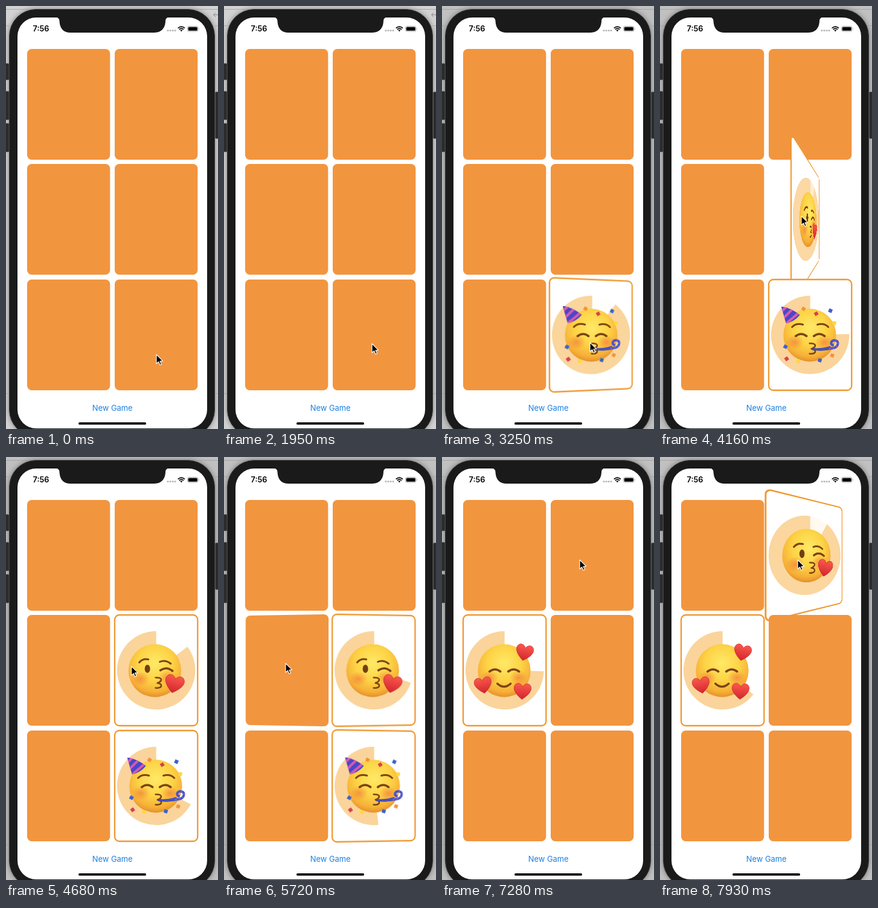
Recreate the animation shown at these times as an HTML page. Size 351x699 px, loop 8000 ms.

```html
<!DOCTYPE html>
<html lang="en">
<head>
<meta charset="utf-8">
<title>Memory game</title>
<style>
  html, body { margin: 0; width: 100%; height: 100%; overflow: hidden; }
  #stage { position: relative; width: 351px; height: 699px; overflow: hidden; background: #d2d2d2; }
  #stage.dimmed { background: #c0c0c0; }
  #stage.dimmed .arrow { display: none; }
  #stage > svg { position: absolute; left: 0; top: 0; overflow: visible; }
  #body { position: absolute; left: 5px; top: 5px; width: 341px; height: 707px; box-sizing: border-box;
    border: 1px solid #3a3a3a; border-radius: 45px; background: #1a1a1a; box-shadow: 0 0 9px rgba(0,0,0,.4); }
  .card { position: absolute; width: 137.3px; height: 183px; }
  .card svg { position: absolute; left: 0; top: 0; overflow: visible; }
  text { font-family: Inter, sans-serif; }
</style>
</head>
<body>
<div id="stage">
  <div id="body"></div>
  <svg width="351" height="699">
    <defs>
      <radialGradient id="skin" cx=".5" cy=".36" r=".66">
        <stop offset="0" stop-color="#ffe967"/>
        <stop offset=".5" stop-color="#fdd345"/>
        <stop offset=".82" stop-color="#f6b038"/>
        <stop offset="1" stop-color="#e28a26"/>
      </radialGradient>
      <radialGradient id="blush">
        <stop offset="0" stop-color="#f0703a" stop-opacity=".6"/>
        <stop offset="1" stop-color="#f0703a" stop-opacity="0"/>
      </radialGradient>
      <linearGradient id="red" x2="0" y2="1">
        <stop offset="0" stop-color="#fa5a4c"/>
        <stop offset="1" stop-color="#d3242e"/>
      </linearGradient>
      <clipPath id="hatShape"><path d="M-48-47Q-32-45-17-33Q-26-22-40-19Z"/></clipPath>
    </defs>
    <path d="M0 5.5H40M311 5.5H351M0 32.5H5M346 32.5H351M0 640.5H5M346 640.5H351" stroke="#999" opacity=".7"/>
    <path class="arrow" d="M351 14.500H343.500M347 11L343.500 14.500L347 18" fill="none" stroke="#888"/>
    <g fill="#2b2b2b" stroke="#555" stroke-width=".7">
      <rect x="-3" y="95" width="8" height="27" rx="1.500"/>
      <rect x="-3" y="141" width="8" height="47" rx="1.500"/>
      <rect x="-3" y="194" width="8" height="47" rx="1.500"/>
      <rect x="346.500" y="142" width="8" height="77" rx="1.500"/>
    </g>
    <rect x="19" y="19" width="314" height="679" rx="31" fill="#fff"/>
    <path d="M82 18.500Q88.500 19 88.500 25C89 37 95 44 107 44H245C257 44 263.500 37 264 25Q264 19 270 18.500Z" fill="#1a1a1a"/>
    <text x="44.500" y="42" font-size="12.700" font-weight="600">7:56</text>
    <g fill="#b8b8b8">
      <circle cx="268" cy="40.500" r="1.600"/><circle cx="272" cy="40.500" r="1.600"/>
      <circle cx="276" cy="40.500" r="1.600"/><circle cx="280" cy="40.500" r="1.600"/>
    </g>
    <g fill="none" stroke="#000" stroke-width="1.700">
      <path d="M284.700 36.600Q290.300 31.500 296 36.600M286.700 38.800Q290.300 35.500 294 38.800"/>
      <path d="M288.300 40L290.300 42.300L292.300 40Q290.300 38.300 288.300 40Z" fill="#000" stroke="none"/>
    </g>
    <rect x="300.500" y="33.500" width="17.500" height="8.500" rx="2.500" fill="none" stroke="#999" stroke-width=".8"/>
    <rect x="301.700" y="34.700" width="15.100" height="6.100" rx="1.500"/>
    <path d="M319 36.300Q320.600 37.700 319 39.200Z" fill="#999"/>
    <text x="176.200" y="668.700" font-size="12.900" text-anchor="middle" fill="#1f80e0">New Game</text>
    <rect x="120" y="688" width="112" height="3.800" rx="1.900"/>
  </svg>
  <div id="cards"></div>
  <svg id="cursor" width="12" height="19">
    <path d="M0 0V15L3.500 11.800L6 17.300L8.400 16.200L6 11L10.600 10.600Z" fill="#000" stroke="#fff" stroke-width="1.100" stroke-linejoin="round"/>
  </svg>
</div>
<script>
const LOOP = 8000, FLIP = 750, PIE_RATE = 56.5 / 1000, PIE_RADIUS = 64.8;
const WIDTH = 137.3, HEIGHT = 183;
const ORANGE = '#f2953f';

// Emoji are drawn around the card centre.
const line = (d, width = 3) =>
  `<path d="${d}" fill="none" stroke="#7c4312" stroke-width="${width}" stroke-linecap="round" stroke-linejoin="round"/>`;
const head = x => `<circle cx="${x}" cy=".5" r="43.7" fill="url(#skin)"/>`;
const blush = (x, y) => `<ellipse cx="${x}" cy="${y}" rx="15" ry="12" fill="url(#blush)"/>`;
const closedEye = (x, y) => line(`M${x - 9} ${y + 2}Q${x} ${y - 5} ${x + 9} ${y + 2}`, 3.6);
const heart = (x, y, turn, size = 1) =>
  `<path transform="translate(${x} ${y}) rotate(${turn}) scale(${size})" fill="url(#red)" stroke="#c3202a" stroke-width=".6"
    d="M0 14C-14 4-16-4-13-9C-10-14-3-13 0-7C3-13 10-14 13-9C16-4 14 4 0 14Z"/>`;
const kissMouth = (x, y) =>
  line(`M${x - 5} ${y - 9}Q${x + 6} ${y - 9} ${x + 4} ${y - 4}Q${x + 2} ${y - 1} ${x - 2} ${y}Q${x + 6} ${y + 1} ${x + 4} ${y + 6}Q${x + 1} ${y + 9} ${x - 5} ${y + 8}`, 2.5);
const confetti = (x, y, color, turn) =>
  `<rect x="-3" y="-3" width="6" height="6" fill="${color}" transform="translate(${x} ${y}) rotate(${turn})"/>`;

const party = () => {
  const [blue, red, yellow, amber] = ['#3c62cf', '#d8414e', '#ffd83c', '#f2943a'];
  const bits = [[10, -35, red, 60], [33.5, -40, blue, 25], [40, -19.5, yellow, 10], [-11, -43, amber, 30],
    [-41, 19.500, blue, 30], [-39, 39.500, red, 55], [-20, 43, yellow, 10], [16, 42, blue, 20], [36.500, 34, amber, 20]];
  return head(-.7) + blush(-25, 12) + blush(23, 12) +
    line('M-30-13Q-23-20-12-17') + line('M12-17Q23-20 30-13') +
    closedEye(-15, 0) + closedEye(15, 0) + kissMouth(4, 23) +
    `<g clip-path="url(#hatShape)"><path d="M-55-55H0V0H-55Z" fill="#4a47c4"/>
      <path d="M-50-36L-36-50M-47-25L-25-47M-42-17L-16-39" stroke="#d758b4" stroke-width="4"/></g>
    <path d="M4 22Q18 24 33 19L34 24Q18 27 4 25Z" fill="#4753cb" stroke="#3541ad"/>
    <path d="M31 22C47 24 50 10 41 9C34 8 32 17 39 17" fill="none" stroke="#4652cc" stroke-width="4"/>
    <path d="M31 22C47 24 50 10 41 9" fill="none" stroke="#a35fd0" stroke-width="1.400" stroke-dasharray="3 3"/>` +
    bits.map(b => confetti(...b)).join('');
};

const kiss = () => head(-2.2) + blush(-26, 14) + blush(18, 12) +
  line('M-28-13Q-22-20-13-18') + line('M6-14Q15-18 24-11') +
  '<ellipse cx="-14.500" cy="-2.500" rx="4.500" ry="6.700" fill="#70400f"/>' +
  line('M7 0Q17-7 27 1', 3.6) + kissMouth(4, 21) + heart(30, 22, 14, 1.1);

const adore = () => head(-.7) + blush(-25, 12) + blush(23, 12) +
  closedEye(-16, 0) + closedEye(15, 0) + line('M-12 22Q-1 32 10 22', 3.4) +
  heart(33, -30, 12) + heart(-35.5, 24, -10) + heart(29.5, 34, 4);

const cards = [
  {},
  { emoji: kiss, up: 7380 },
  { emoji: adore, up: 5666 },
  { emoji: kiss, up: 3744, down: 5666 },
  {},
  { emoji: party, up: 2590, down: 5666 },
];

const cursorPath = [
  [0, 249, 576], [1500, 249, 576], [1690, 245, 558], [2300, 245, 558], [2560, 245, 556], [3260, 245, 556],
  [3720, 234, 347], [4420, 234, 347], [5330, 102, 341], [6300, 102, 341], [7250, 228, 170], [LOOP, 228, 170],
];

const stage = document.getElementById('stage');
const cursor = document.getElementById('cursor');

cards.forEach((card, i) => {
  const box = document.createElement('div');
  box.className = 'card';
  box.style.left = 35 + 144.8 * (i % 2) + 'px';
  box.style.top = 71 + 190.4 * Math.floor(i / 2) + 'px';
  const plate = style => `<rect x="${-WIDTH / 2}" y="${-HEIGHT / 2}" width="${WIDTH}" height="${HEIGHT}" rx="7.600" ${style}/>`;
  box.innerHTML = `<svg width="${WIDTH}" height="${HEIGHT}"><g transform="translate(${WIDTH / 2} ${HEIGHT / 2})">
    <g class="back">${plate(`fill="${ORANGE}"`)}</g>
    <g class="front">${plate('fill="#fff" stroke="#ee9932" stroke-width="2.300"')}
      <circle class="disc" r="${PIE_RADIUS}" fill="#f29305"/><path class="pie" fill="#f29305"/>
      ${card.emoji ? card.emoji() : ''}</g></g></svg>`;
  document.getElementById('cards').append(box);
  card.box = box;
  for (const part of ['back', 'front', 'disc', 'pie']) card[part] = box.querySelector('.' + part);
});

const clamp = x => Math.min(1, Math.max(0, x));
const smooth = x => x * x * (3 - 2 * x);

// cubic-bezier(.42, 0, .58, 1)
function easeInOut(x) {
  let low = 0, high = 1;
  for (let i = 0; i < 20; i++) {
    const s = (low + high) / 2;
    const at = 1.26 * s * (1 - s) ** 2 + 1.74 * s * s * (1 - s) + s ** 3;
    if (at < x) low = s; else high = s;
  }
  return smooth((low + high) / 2);
}

const flipped = (t, start) => start === undefined ? 0 : easeInOut(clamp((t - start) / FLIP));

function piePath(missing) {
  const a = missing * Math.PI / 180, r = PIE_RADIUS;
  return `M0 0L${r * Math.sin(a)} ${-r * Math.cos(a)}A${r} ${r} 0 ${missing < 180 ? 1 : 0} 1 0 ${-r}Z`;
}

function drawCard(card, t) {
  const up = flipped(t, card.up);
  const angle = 180 * (1 - up + flipped(t, card.down));
  const faceUp = angle < 90;
  card.box.style.transform = angle > .05 && angle < 179.95 ? `perspective(${HEIGHT}px) rotateY(${angle}deg)` : 'none';
  card.front.style.display = faceUp ? '' : 'none';
  card.back.style.display = faceUp ? 'none' : '';
  if (!faceUp) return;
  const spent = Math.min(t, card.down ?? LOOP) - card.up;
  card.pie.setAttribute('d', piePath(Math.max(.1, spent * PIE_RATE)));
  card.pie.style.opacity = .4 * up;
  card.disc.style.opacity = .4 * (1 - up);
}

function drawCursor(t) {
  const next = cursorPath.findIndex(p => p[0] > t);
  const [t0, x0, y0] = cursorPath[next - 1], [t1, x1, y1] = cursorPath[next];
  const k = smooth((t - t0) / (t1 - t0));
  cursor.style.transform = `translate(${x0 + (x1 - x0) * k}px, ${y0 + (y1 - y0) * k}px)`;
}

function draw() {
  const t = performance.now() % LOOP;
  stage.classList.toggle('dimmed', t >= 2600);
  cards.forEach(card => drawCard(card, t));
  drawCursor(t);
  requestAnimationFrame(draw);
}
draw();
</script>
</body>
</html>
```
